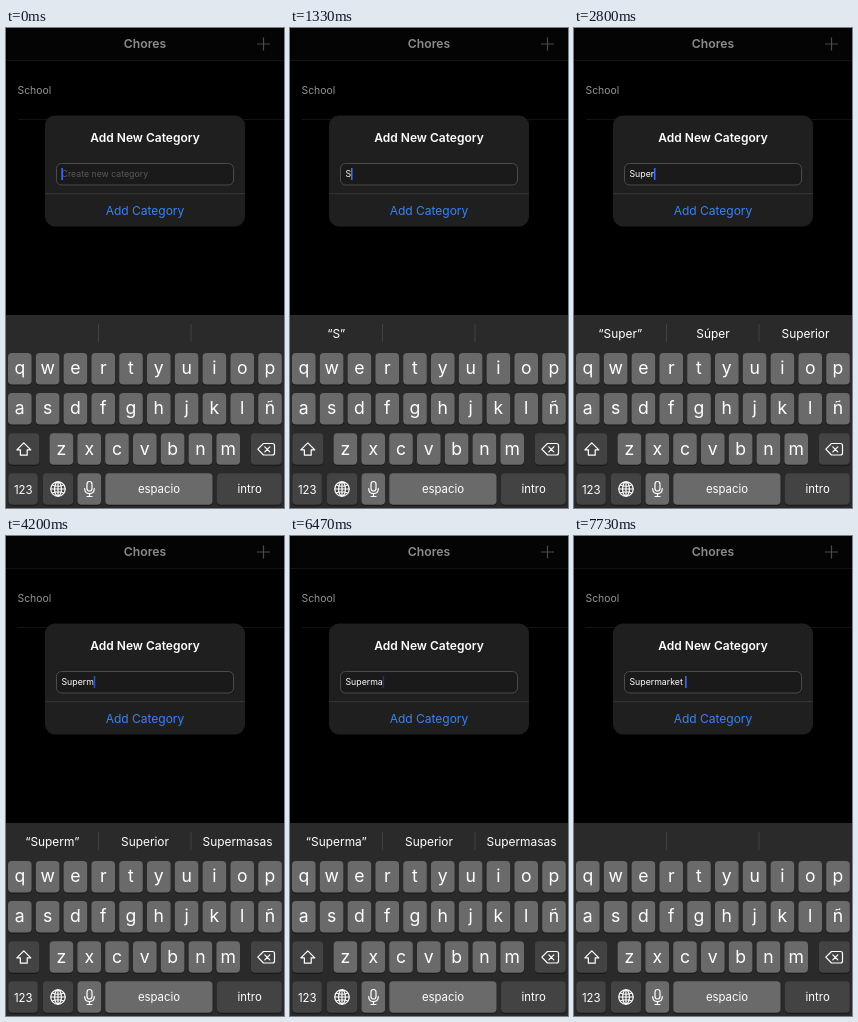
These frames come from a looping animation (278x480 px, 8 s). An HTML page:

```html
<!DOCTYPE html>
<html lang="en">
<head>
<meta charset="utf-8">
<title>Add category</title>
<style>
  html, body { margin: 0; width: 100%; height: 100%; overflow: hidden; background: #000; }
  svg { display: block; width: 278px; height: 480px; font-family: Inter, Roboto, sans-serif; fill: #fff; }
  .mid { text-anchor: middle; }
  .line { fill: none; stroke: #fff; stroke-width: 1.2; stroke-linejoin: round; stroke-linecap: round; }
  .key { fill: #6a6a6b; }
  .dark { fill: #434344; }
  .field { font-size: 8.75px; white-space: pre; }
  .sug { font-size: 11.9px; }
  .label { font-size: 11.4px; }
</style>
</head>
<body>
<svg id="stage" viewBox="0 0 278 480">
  <rect width="278" height="480" fill="#000"/>
  <rect width="278" height="32" fill="#040404"/>
  <path d="M0 32.5H278M12 91.5H278" stroke="#121213"/>
  <text class="mid" x="139" y="20.3" font-size="12.2" font-weight="600" fill="#8c8c8c">Chores</text>
  <path d="M251 16H264M257.500 9.500V22.500" stroke="#4b4b4b" stroke-width="1.200"/>
  <text x="11.500" y="65.700" font-size="10.400" fill="#939393">School</text>

  <rect x="39" y="87.500" width="200" height="111" rx="10" fill="#1f1f20"/>
  <text class="mid" x="139" y="114.300" font-size="12" font-weight="600">Add New Category</text>
  <rect x="50.500" y="135.500" width="177" height="21.500" rx="5" fill="#1a1a1b" stroke="#4b4b4d"/>
  <text id="hint" class="field" x="55.500" y="149.300" fill="#59595c">Create new category</text>
  <text id="typed" class="field" x="55.500" y="149.300" xml:space="preserve"></text>
  <rect id="caret" y="140" width="1.500" height="12" fill="#416ff5"/>
  <path d="M39 165.700H239" stroke="#3b3b3d" stroke-width=".8"/>
  <text class="mid" x="139" y="186.700" font-size="12" fill="#3b82f2">Add Category</text>

  <rect y="287" width="278" height="193" fill="#2a2a2b"/>
  <path d="M92.500 296V314M185 296V314" stroke="#434345" stroke-width=".9"/>
  <rect id="glow" x="94" y="291" width="90" height="29" rx="4" fill="#5a5a5c"/>
  <g id="sugs"></g>
  <g id="keys"></g>

  <path id="arrow" class="line" d="M17.800 414.800L24.800 421.800H21.200V427.200H14.400V421.800H10.800Z"/>
  <path class="line" d="M257.500 415.500H266.500Q268.500 415.500 268.500 417.500V425Q268.500 427 266.500 427H257.500L251.800 421.200ZM258.800 418.800L263.800 423.800M263.800 418.800L258.800 423.800"/>
  <g class="line" stroke-width="1">
    <circle cx="52" cy="461" r="7.200"/>
    <ellipse cx="52" cy="461" rx="3.400" ry="7.200"/>
    <path d="M44.800 461H59.200M52 453.800V468.200M46.200 457Q52 459.500 57.800 457M46.200 465Q52 462.500 57.800 465"/>
    <rect x="81" y="453.500" width="5" height="9.500" rx="2.500"/>
    <path d="M78.700 460.500Q78.700 465.600 83.500 465.600T88.300 460.500M83.500 465.600V468.500M81 468.500H86"/>
  </g>
  <text class="mid label" x="17.300" y="465.500">123</text>
  <text class="mid label" x="153" y="465">espacio</text>
  <text class="mid label" x="243.700" y="465">intro</text>
  <g id="pop">
    <path class="key"/>
    <text class="mid" font-size="24.500"></text>
  </g>
</svg>
<script>
const LOOP = 8000, STEP = 27.8, KEY_W = 23.6, KEY_H = 31.5;
const $ = id => document.getElementById(id);

function add(parent, tag, attrs, text = '') {
  const el = document.createElementNS('http://www.w3.org/2000/svg', tag);
  for (const k in attrs) el.setAttribute(k, attrs[k]);
  el.textContent = text;
  parent.append(el);
  return el;
}

function cap(x, y, width, type) {
  const box = { x, y, width, height: KEY_H, rx: 4 };
  add($('keys'), 'rect', { ...box, y: y + 1, fill: '#161617' });
  return add($('keys'), 'rect', { ...box, class: type });
}

const keys = {};
[['qwertyuiop', 13.8, 325], ['asdfghjklñ', 13.8, 365], ['zxcvbnm', 55.4, 405.3]].forEach(([row, x0, y]) =>
  [...row].forEach((ch, i) => {
    const x = x0 + i * STEP;
    cap(x - KEY_W / 2, y, KEY_W, 'key');
    const glyph = add($('keys'), 'text', { class: 'mid', x, y: y + 21.2 }, ch);
    keys[ch] = { x, y, glyph };
  }));

const shift = cap(2.3, 405.3, 31, 'dark');
cap(244.8, 405.3, 31, 'dark');
cap(2.3, 445.3, 29.5, 'dark');
cap(36.8, 445.3, 30.5, 'dark');
cap(71.5, 445.3, 23.6, 'key');
cap(99.3, 445.3, 107.2, 'key');
cap(211, 445.3, 64.8, 'dark');

const sugs = [46.3, 139, 231.5].map(x => add($('sugs'), 'text', { class: 'mid sug', x, y: 309.8 }));

// State changes: [time, changed fields]
const events = [
  [0, { text: '', sug: [], pop: '', caps: false, glow: 0 }],
  [730, { caps: true }],
  [1200, { pop: 's' }],
  [1330, { pop: '', caps: false, text: 'S', sug: ['“S”'] }],
  [1530, { pop: 'u' }],
  [1600, { text: 'Su', sug: ['“S”', 'Se', 'Sin'] }],
  [1670, { pop: '' }],
  [1870, { sug: ['“Su”', 'Supongo', 'Sus'] }],
  [2070, { pop: 'p' }],
  [2130, { text: 'Sup' }],
  [2200, { pop: '', sug: ['“Sup”', 'Supongo', 'Super'] }],
  [2270, { pop: 'e' }],
  [2330, { text: 'Supe' }],
  [2400, { pop: '', sug: ['“Supe”', 'Súper', 'Superior'] }],
  [2470, { pop: 'r' }],
  [2530, { text: 'Super' }],
  [2600, { pop: '' }],
  [2800, { sug: ['“Super”', 'Súper', 'Superior'] }],
  [3470, { pop: 'm' }],
  [3530, { text: 'Superm' }],
  [3600, { pop: '' }],
  [3730, { sug: ['“Superm”', 'Superior', 'Supermasas'] }],
  [4530, { pop: 'a' }],
  [4600, { text: 'Superma' }],
  [4670, { pop: '', sug: ['“Superma”', 'Superior', 'Supermasas'] }],
  [6530, { pop: 'r' }],
  [6600, { text: 'Supermar' }],
  [6730, { pop: '', sug: ['“Supermar”', 'Supermarket', 'Supermarcas'] }],
  [6870, { pop: 'k' }],
  [6930, { text: 'Supermark' }],
  [7000, { pop: '' }],
  [7130, { sug: ['“Supermark”', 'Supermarket', 'Supermarked'] }],
  [7400, { glow: 1 }],
  [7530, { text: 'Supermarket ' }],
  [7600, { sug: [], glow: .5 }],
  [7730, { glow: 0 }]
];

// Caret fades: [start, final opacity]
const fades = [[70, 0], [400, 1], [3070, 0], [3470, 1], [4200, 0], [4530, 1],
  [5070, 0], [5470, 1], [6130, 0], [6470, 1]];

function caretAlpha(t) {
  const fade = fades.filter(f => f[0] <= t).pop();
  if (!fade) return 1;
  const part = Math.min(3, 1 + Math.floor((t - fade[0]) / 65)) / 3;
  return fade[1] ? part : 1 - part;
}

function popPath(x, y) {
  const l = x - KEY_W / 2, r = x + KEY_W / 2, b = y + KEY_H, T = y - 48;
  const L = Math.max(2, Math.min(x - 21.2, 233.2)), R = L + 42.4;
  return {
    cx: (L + R) / 2,
    d: `M${L + 7} ${T}H${R - 7}Q${R} ${T} ${R} ${T + 7}V${T + 36}C${R} ${T + 47} ${r} ${T + 46} ${r} ${T + 58}
      V${b - 4}Q${r} ${b} ${r - 4} ${b}H${l + 4}Q${l} ${b} ${l} ${b - 4}V${T + 58}
      C${l} ${T + 46} ${L} ${T + 47} ${L} ${T + 36}V${T + 7}Q${L} ${T} ${L + 7} ${T}Z`
  };
}

function render(s) {
  const show = ch => s.caps ? ch.toUpperCase() : ch;
  $('hint').style.opacity = s.text ? 0 : 1;
  $('typed').textContent = s.text;
  $('caret').setAttribute('x', 55.4 + (s.text ? $('typed').getComputedTextLength() : 0));
  sugs.forEach((el, i) => el.textContent = s.sug[i] || '');
  $('glow').style.opacity = s.glow;
  for (const ch in keys) {
    const g = keys[ch].glyph;
    g.textContent = ch === s.pop ? '' : show(ch);
    g.style.fontSize = s.caps ? '16px' : '17.6px';
  }
  shift.style.fill = s.caps ? '#dcdcdc' : '';
  $('arrow').style.fill = $('arrow').style.stroke = s.caps ? '#000' : '';
  $('pop').style.display = s.pop ? '' : 'none';
  if (s.pop) {
    const { x, y } = keys[s.pop], { cx, d } = popPath(x, y), [shape, label] = $('pop').children;
    shape.setAttribute('d', d);
    label.setAttribute('x', cx);
    label.setAttribute('y', y - 18);
    label.textContent = show(s.pop);
  }
}

let last = 0;
function tick() {
  const t = performance.now() % LOOP;
  const past = events.filter(e => e[0] <= t);
  if (past.length !== last) {
    last = past.length;
    render(Object.assign({}, ...past.map(e => e[1])));
  }
  $('caret').style.opacity = caretAlpha(t);
  requestAnimationFrame(tick);
}
tick();
</script>
</body>
</html>
```
